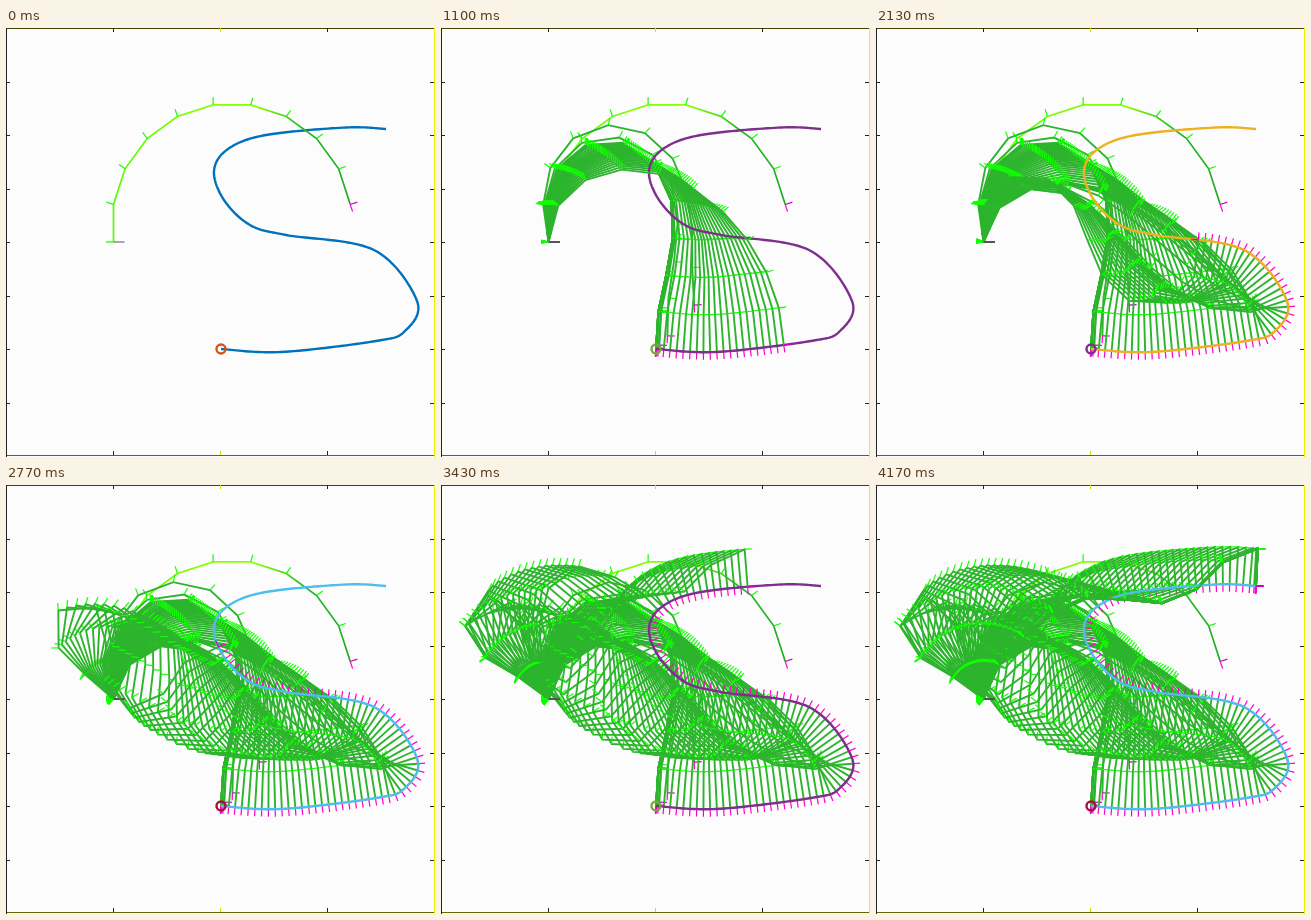
An HTML page with a canvas for the animation above (4.21 s loop, 429 by 429 pixels).

```html
<!DOCTYPE html>
<html>
<head>
<meta charset="utf-8">
<style>
html, body { margin: 0; width: 100%; height: 100%; overflow: hidden; background: #fcfcfd; }
canvas { display: block; }
</style>
</head>
<body>
<canvas id="stage" width="429" height="429"></canvas>
<script>
const ctx = document.getElementById('stage').getContext('2d');
const SIZE = 429, STEPS = 126, LOOP = 4210;
const BASE = [107.5, 214], LINK = 37.5, LINKS = 10, MARK = 7.5;
const START = 13.5, TRAVEL = 100; // when the goal leaves, and its steps along the path
const GAIN = 0.7, SUBSTEPS = 8;
const ORDER = ['#0072bd', '#d95319', '#edb120', '#7e2f8e', '#77ac30', '#4dbeee', '#a2142f'];
const KNOTS = [
  [215, 321], [275, 324], [370, 313], [399, 303], [411, 273], [368, 222], [280, 207],
  [244, 197], [218, 172], [208, 143], [222, 121], [260, 107], [340, 99.5], [380, 101]
];

const clamp = (v, lo, hi) => Math.min(hi, Math.max(lo, v));
const mix = (a, b, k) => a + (b - a) * k;
const sum = list => list.reduce((a, b) => a + b, 0);
const dot = (a, b) => sum(a.map((v, i) => v * b[i]));

function spline(a, b, c, d, u) {
  return b + u / 2 * (c - a + u * (2 * a - 5 * b + 4 * c - d + u * (3 * (b - c) + d - a)));
}

// Path samples as [x, y, distance]
const path = [];
for (let i = 0; i < KNOTS.length - 1; i++) {
  const [a, b, c, d] = [-1, 0, 1, 2].map(k => KNOTS[clamp(i + k, 0, KNOTS.length - 1)]);
  for (let k = i ? 1 : 0; k <= 20; k++) {
    const [x, y] = [0, 1].map(j => spline(a[j], b[j], c[j], d[j], k / 20));
    const last = path[path.length - 1];
    path.push([x, y, last ? last[2] + Math.hypot(x - last[0], y - last[1]) : 0]);
  }
}

// Place on the path, and the heading to the right of its direction
function goalAt(n) {
  const end = path.length - 1;
  const s = clamp((n - START) / TRAVEL, 0, 1) * path[end][2];
  const i = clamp(path.findIndex(p => p[2] >= s), 1, end);
  const a = path[i - 1], b = path[i], k = (s - a[2]) / (b[2] - a[2]);
  return {
    x: mix(a[0], b[0], k),
    y: mix(a[1], b[1], k),
    heading: Math.atan2(a[1] - b[1], b[0] - a[0]) - Math.PI / 2
  };
}

function pose(turns) {
  const pts = [BASE], headings = [];
  let h = 0;
  for (const turn of turns) {
    const [x, y] = pts[pts.length - 1];
    headings.push(h += turn);
    pts.push([x + LINK * Math.cos(h), y - LINK * Math.sin(h)]);
  }
  return { pts, headings, tip: pts[LINKS], heading: h };
}

// Least-squares joint turns that shift the tip by (dx, dy) and rotate it by dh
function resolve({ pts, tip }, dx, dy, dh) {
  const center = list => {
    const mean = sum(list) / LINKS;
    return [mean, list.map(v => v - mean)];
  };
  const joints = pts.slice(0, LINKS);
  const [meanX, ax] = center(joints.map(p => tip[1] - p[1]));
  const [meanY, ay] = center(joints.map(p => tip[0] - p[0]));
  const ex = dx - dh * meanX, ey = dy - dh * meanY;
  const xx = dot(ax, ax), xy = dot(ax, ay), yy = dot(ay, ay);
  const det = xx * yy - xy * xy;
  const lx = (yy * ex - xy * ey) / det, ly = (xx * ey - xy * ex) / det;
  return ax.map((v, i) => v * lx + ay[i] * ly + dh / LINKS);
}

function advance(turns, goal) {
  const { tip, heading } = pose(turns);
  const off = goal.heading - heading;
  const x = mix(tip[0], goal.x, GAIN), y = mix(tip[1], goal.y, GAIN);
  const h = heading + GAIN * Math.atan2(Math.sin(off), Math.cos(off));
  for (let left = SUBSTEPS; left > 0; left--) {
    const now = pose(turns);
    const change = resolve(now, (x - now.tip[0]) / left, (now.tip[1] - y) / left, (h - now.heading) / left);
    turns = turns.map((v, i) => v + change[i]);
  }
  return turns;
}

const arms = [];
let turns = Array.from({ length: LINKS }, (_, i) => i ? -Math.PI / 10 : Math.PI / 2);
for (let n = 0; n < STEPS; n++) {
  if (n) turns = advance(turns, goalAt(n));
  arms.push(pose(turns));
}

function stroke(points, color, width) {
  ctx.beginPath();
  points.forEach(p => ctx.lineTo(p[0], p[1]));
  ctx.strokeStyle = color;
  ctx.lineWidth = width;
  ctx.stroke();
}

function ray([x, y], angle, color) {
  stroke([[x, y], [x + MARK * Math.cos(angle), y - MARK * Math.sin(angle)]], color, 1.2);
}

const firstTint = ctx.createLinearGradient(108, 0, 345, 0);
[[0, '#5f0'], [0.4, '#8f0'], [0.6, '#8f0'], [0.8, '#2b2'], [1, '#2a2']]
  .forEach(s => firstTint.addColorStop(...s));

function drawArm({ pts, headings, tip, heading }, first) {
  stroke(pts, first ? firstTint : '#2db42d', first ? 1.7 : 1.9);
  headings.forEach((h, i) => ray(pts[i], h + Math.PI / 2, '#1f0'));
  ray(tip, heading, '#f0c');
  ray(tip, heading + Math.PI / 2, '#c0c');
  stroke([BASE, [BASE[0] + 11, BASE[1]]], '#555', 1);
}

function box(color, ...r) {
  ctx.fillStyle = color;
  ctx.fillRect(...r);
}

function drawAxes() {
  const dark = '#222', end = SIZE - 1;
  box('#440', 0, 0, SIZE, 1);
  box('#660', 0, end - 1, SIZE, 1);
  box(dark, 0, 0, 1, SIZE);
  box('#ee0', end, 0, 1, SIZE);
  for (let i = 1; i < 8; i++) {
    const at = Math.round(i * 53.5);
    box(dark, 0, at, 4, 1);
    box(dark, end - 4, at, 4, 1);
    if (i % 2) continue;
    const tint = i === 4 ? '#dd0' : dark;
    box(tint, at, 0, 1, 4);
    box(tint, at, end - 5, 1, 4);
  }
}

function draw(n) {
  box('#fcfcfd', 0, 0, SIZE, SIZE);
  drawAxes();
  for (let i = 0; i < n; i++) drawArm(arms[i], !i);
  stroke(path, ORDER[2 * n % 7], 2.4);
  drawArm(arms[n], !n);
  ctx.beginPath();
  ctx.arc(...KNOTS[0], 4.5, 0, 2 * Math.PI);
  ctx.strokeStyle = ORDER[(2 * n + 1) % 7];
  ctx.lineWidth = 2.4;
  ctx.stroke();
}

let shown = -1;
function tick() {
  const t = performance.now() % LOOP;
  let n = Math.min(STEPS - 1, Math.floor(t * 0.03 + 0.15));
  if (Math.round(n * 10 / 3) * 10 > t) n--;
  if (n !== shown) draw(shown = n);
  requestAnimationFrame(tick);
}
tick();
</script>
</body>
</html>
```
